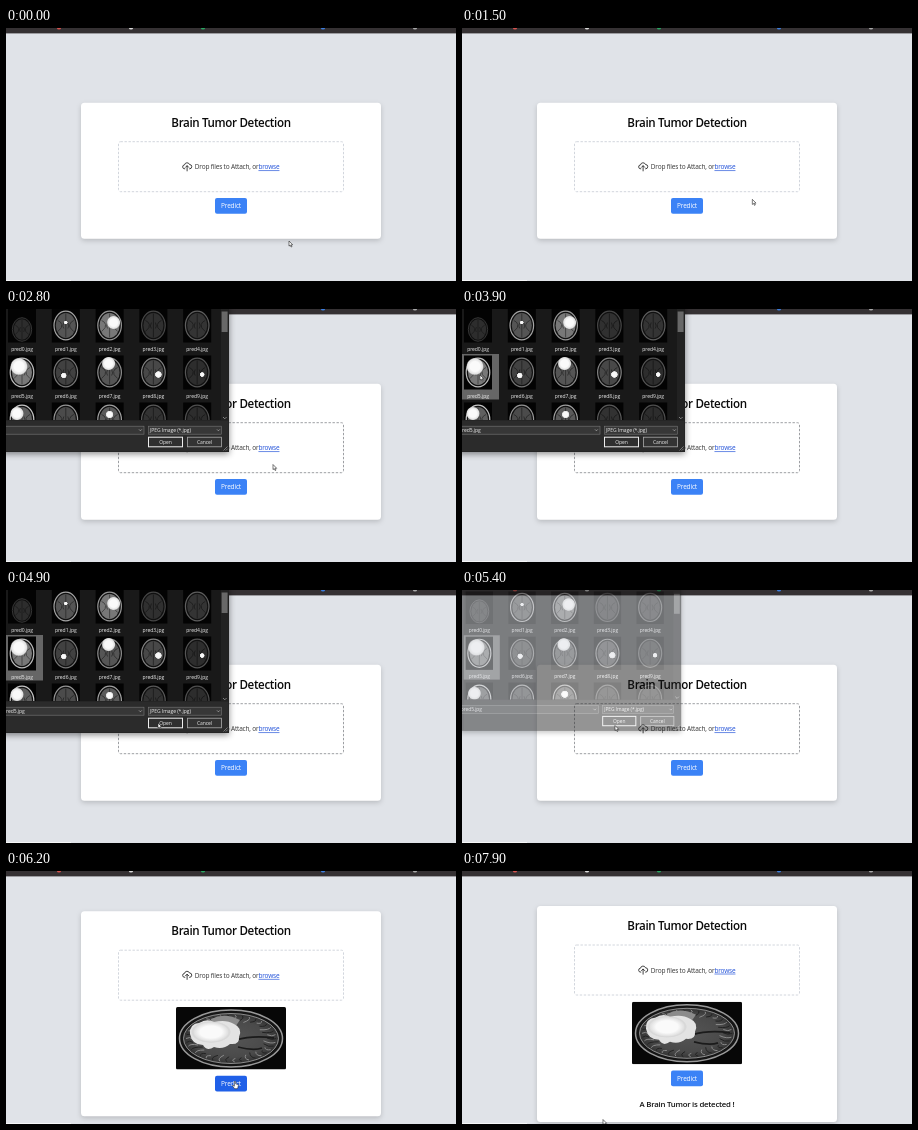
Write an HTML page that moves like this. It is 450 by 253 pixels and loops after 8 s.

```html
<!DOCTYPE html>
<html lang="en">
<head>
<meta charset="utf-8">
<title>Brain Tumor Detection</title>
<style>
  html, body { margin: 0; width: 100%; height: 100%; overflow: hidden; background: #e0e3e8; }
  svg { display: block; width: 100vw; height: 100vh; }
  text { font-family: "Open Sans", "Noto Sans", sans-serif; }
  .title { font-size: 11.6px; font-weight: 600; letter-spacing: -.35px; text-anchor: middle; fill: #0a0a0a; }
  .body { font-size: 6.5px; letter-spacing: -.18px; fill: #333; }
  .link { fill: #1d4ed8; text-decoration: underline; }
  .result { font-size: 7.8px; font-weight: 600; letter-spacing: -.23px; text-anchor: middle; fill: #111; }
  .small { font-size: 5px; letter-spacing: -.05px; fill: #eee; }
  .mid { text-anchor: middle; }
  .card { filter: drop-shadow(0 2px 2.5px rgba(0, 0, 0, .17)); }
</style>
</head>
<body>
<svg viewBox="0 0 450 253">
  <defs>
    <clipPath id="pane"><rect x="0" y="0" width="215" height="111"/></clipPath>
    <clipPath id="photoClip"><rect width="110" height="62.5" rx="1.5"/></clipPath>
    <radialGradient id="lesion">
      <stop offset=".55" stop-color="#fafafa"/><stop offset=".85" stop-color="#e0e0e0"/>
      <stop offset="1" stop-color="#bbb" stop-opacity="0"/>
    </radialGradient>
    <radialGradient id="tissue">
      <stop offset="0" stop-color="#555"/><stop offset=".75" stop-color="#4a4a4a"/><stop offset="1" stop-color="#333"/>
    </radialGradient>
    <pattern id="hatch" width="3" height="3" patternUnits="userSpaceOnUse">
      <rect width="1.4" height="1.4" fill="#999" opacity=".3"/>
    </pattern>
  </defs>

  <rect width="450" height="253" fill="#e0e3e8"/>
  <rect y="252" width="65" height="1" fill="#f6f7f8"/>
  <rect width="450" height="5.4" fill="#353133"/>
  <g id="tabs"></g>

  <g id="card">
    <rect id="panel" class="card" x="75" width="300" height="136" rx="3.5" fill="#fff"/>
    <text class="title" x="225" y="24.3">Brain Tumor Detection</text>
    <rect id="zone" x="112.5" y="39" width="225" height="50" rx="2" fill="none" stroke-width=".9" stroke-dasharray="2.4 1.6"/>
    <g fill="none" stroke="#222" stroke-width=".85" stroke-linecap="round" stroke-linejoin="round">
      <path d="M178.8 66.2a2 2 0 0 1-.3-4a2.6 2.6 0 0 1 5-.4a2.2 2.2 0 0 1 .1 4.4"/>
      <path d="M181.1 68.2v-5M179.5 64.6l1.6-1.6l1.6 1.6"/>
    </g>
    <text class="body" x="188.8" y="66.7">Drop files to Attach, or<tspan class="link">browse</tspan></text>
    <g id="photo" transform="translate(170 95.8)" clip-path="url(#photoClip)">
      <rect width="110" height="62.5" fill="#070707"/>
      <ellipse cx="55" cy="31.5" rx="51.5" ry="28.5" fill="#151515" stroke="#999" stroke-width="1.5"/>
      <ellipse cx="55" cy="31.5" rx="47.5" ry="25" fill="url(#tissue)" stroke="#bbb" stroke-width=".7"/>
      <g id="folds" fill="none" stroke-width="1"></g>
      <path d="M35 12q14-7 29 1l-5 7H36z" fill="#8b8b8b"/>
      <path d="M60 33q17-5 38-2M62 40q16 4 24 1" fill="none" stroke="#1b1b1b" stroke-width="1.8"/>
      <path d="M14 27q-1-10 9-11q8-5 15-1q12-3 20 2q9 4 5 13q1 8-9 7q-7 6-16 3q-7 5-11-2q-11 0-13-11z" fill="#e3e3e3"/>
      <ellipse cx="35" cy="25" rx="20" ry="11" fill="url(#lesion)"/>
    </g>
    <g id="button">
      <rect id="buttonFace" x="209" width="32" height="15.8" rx="2"/>
      <text class="body mid" x="225" y="10.3" style="fill:#fff">Predict</text>
    </g>
    <text id="result" class="result" x="225" y="201.2">A Brain Tumor is detected !</text>
  </g>

  <g id="ghost">
    <rect width="222" height="111" fill="#e6e6e4" opacity=".72"/>
    <rect x="215" width="7" height="111" fill="#b5b5b5" opacity=".75"/>
    <rect x="215.5" y="2" width="6" height="20" fill="#999" opacity=".5"/>
    <rect y="111" width="222" height="31.5" fill="#c8c8c8" opacity=".75"/>
    <rect y="111" width="222" height="5" fill="#bbb" opacity=".4"/>
    <rect y="126" width="142" height="15" fill="url(#hatch)"/>
    <path d="M0 117h138v8.5H0zM142 117h73v8.5h-73zM142 128h35v10h-35zM181 128h35v10h-35z" fill="#fff" opacity=".93"/>
    <text class="body" x="187" y="144" id="ghostText"></text>
  </g>

  <g id="dialog">
    <rect x="-5" y="-5" width="228" height="148" fill="#202020" style="filter:drop-shadow(0 2px 3px rgba(0,0,0,.45))"/>
    <rect width="215" height="111" fill="#191919"/>
    <rect id="selection" y="45" width="37" height="45.5" fill="#666"/>
    <g id="files" clip-path="url(#pane)"></g>
    <rect x="215" width="7" height="111" fill="#222"/>
    <rect x="215.6" y="2.5" width="6" height="20.5" fill="#686868"/>
    <path d="M217 108l1.8 1.8l1.8-1.8" fill="none" stroke="#aaa" stroke-width=".7"/>
    <rect y="111.5" width="222.5" height="31" fill="#2b2b2b"/>
    <g fill="#373737" stroke="#777" stroke-width=".6">
      <rect x="-4" y="117.2" width="142" height="8"/>
      <rect x="142.3" y="117.2" width="73" height="8"/>
    </g>
    <path d="M133 120.4l1.4 1.4l1.4-1.4M211 120.4l1.4 1.4l1.4-1.4" fill="none" stroke="#ccc" stroke-width=".6"/>
    <text id="fileName" class="small" x="-3" y="123">pred5.jpg</text>
    <text class="small" x="144" y="123">JPEG Image (*.jpg)</text>
    <rect x="142.5" y="128.2" width="34" height="9.6" fill="#2f2f2f" stroke="#eee" stroke-width="1"/>
    <rect x="181.5" y="128.2" width="34" height="9.6" fill="#333" stroke="#aaa" stroke-width=".8"/>
    <text class="small mid" x="159.5" y="134.8">Open</text>
    <text class="small mid" x="198.5" y="134.8">Cancel</text>
    <path d="M217.5 141.5l4-4M219.8 141.5l1.8-1.8" stroke="#999" stroke-width=".7"/>
  </g>

  <g id="cursor" stroke-linejoin="round" fill="#fff" stroke="#222" stroke-width=".6">
    <path id="arrow" d="M0 0v5.1l1.2-1l.9 1.9l.9-.4l-.9-1.8h1.6z"/>
    <path id="hand" d="M-.7 .6q.7-1 1.4 0v2.3l2.2.5q.6.2.5 1l-.5 2.1l-.5 1.2h-2.8l-2.2-2.9q.2-.9 1.1-.3l.8.7z"/>
  </g>
</svg>

<script>
const LOOP = 8000, STEP = 100;
const $ = id => document.getElementById(id);

function add(parent, tag, attrs, content) {
  const el = document.createElementNS("http://www.w3.org/2000/svg", tag);
  for (const key in attrs) el.setAttribute(key, attrs[key]);
  if (content) el.textContent = content;
  parent.appendChild(el);
  return el;
}

const show = (id, on) => $(id).setAttribute("visibility", on ? "visible" : "hidden");
const grey = v => `rgb(${v},${v},${v})`;

// Tab icons peeking in at the top edge
[[53, "#d9534f"], [125, "#ddd"], [197, "#28a862"], [317, "#3d7fe0"], [409, "#aaa"]]
  .forEach(([cx, fill]) => add($("tabs"), "circle", { cx, cy: -.6, r: 2.2, fill }));

// Scan thumbnails: skull grey, tissue grey, spot x, spot y, spot radius
const scans = [
  [55, 45, 0, 0, 0], [165, 85, 0, -3, 2], [150, 120, 4, -3, 7], [70, 48, 0, 0, 0], [95, 52, 0, 2, 0],
  [190, 120, -3, -6, 9], [120, 65, -2, 3, 3], [140, 85, -1, -9, 7], [130, 72, 5, 2, 3.6], [85, 45, 5, 2, 2.6],
  [200, 95, -5, -6, 7], [150, 75, 0, 0, 0], [160, 90, 0, -5, 4], [90, 50, 0, 0, 0], [80, 45, 0, 0, 0]
];
scans.forEach(([skull, tissue, dx, dy, r], i) => {
  const x = 16 + (i % 5) * 43.8, y = 16.5 + Math.floor(i / 5) * 47;
  const cell = add($("files"), "g", { transform: `translate(${x} ${y})` });
  const size = i ? 1 : .82;
  add(cell, "rect", { x: -14, y: -17, width: 28, height: 34, fill: "#030303" });
  const head = add(cell, "g", { transform: `translate(0 ${i ? 0 : 4}) scale(${size})` });
  add(head, "ellipse", { rx: 11.8, ry: 14.4, fill: "#111", stroke: grey(skull), "stroke-width": 1.2 });
  add(head, "ellipse", { rx: 10, ry: 12.5, fill: grey(tissue) });
  add(head, "path", {
    d: "M0-12V12M-8-5q3 1 4 4t-4 7M8-5q-3 1-4 4t4 7M-2-3q-2 4 0 6M2-3q2 4 0 6",
    fill: "none", stroke: grey(tissue * .55), "stroke-width": .9
  });
  if (r) add(head, "circle", { cx: dx, cy: dy, r: r, fill: "url(#lesion)" });
  add(cell, "text", { class: "small mid", y: 25.3 }, `pred${i}.jpg`);
});

// Cortex folds radiating around the scan's edge
for (let i = 0; i < 38; i++) {
  const a = i / 38 * Math.PI * 2, inner = .78 + .07 * Math.sin(i * 5);
  const at = (k, turn) => `${55 + 46 * k * Math.cos(a + turn)} ${31.5 + 24 * k * Math.sin(a + turn)}`;
  add($("folds"), "path", {
    d: `M${at(.98, 0)}Q${at(.9, .1)} ${at(inner, -.03)}`,
    stroke: i % 2 ? "#8a8a8a" : "#222"
  });
}

const path = [
  [0, 283, 213], [700, 283, 213], [900, 296, 212], [1100, 312, 198], [1300, 303, 180], [1600, 284, 167],
  [1700, 274, 154], [1900, 265, 139], [2100, 265, 140], [2400, 267, 155.5], [2900, 267, 155.5],
  [3100, 232, 142], [3400, 110, 90], [3700, 20, 66], [4000, 17, 66], [4200, 42, 82], [4500, 128, 124],
  [4700, 152, 133], [5200, 152, 133], [5400, 153, 135.5], [5600, 153, 135.5], [5800, 172, 158],
  [6000, 215, 202], [6200, 229, 210], [7300, 229, 210], [7400, 230, 212], [7500, 230, 212],
  [7600, 220, 219], [7900, 141, 248.5], [8000, 141, 248.5]
];

function pointer(t) {
  const n = path.findIndex(p => p[0] > t);
  const [t0, x0, y0] = path[n - 1], [t1, x1, y1] = path[n];
  const k = (t - t0) / (t1 - t0);
  return [x0 + (x1 - x0) * k, y0 + (y1 - y0) * k];
}

// time, opacity, scale
const fades = [
  [0, 0, 1], [2700, .85, .985], [2800, 1, 1], [5300, .9, .99], [5400, .5, .975], [5500, .1, .955], [5600, 0, 1]
];
// time, card top, card height
const layouts = [[0, 75, 136], [5600, 40.5, 205], [6800, 35.3, 216]];
const latest = (table, t) => table.filter(row => row[0] <= t).pop();
const zoom = s => `translate(70 55) scale(${s}) translate(-70 -55)`;
const within = (t, from, to) => t >= from && t < to;

function draw(t) {
  const [, top, height] = latest(layouts, t);
  const loaded = t >= 5600, hover = within(t, 6000, 7600);
  $("card").setAttribute("transform", `translate(0 ${top - .3})`);
  $("panel").setAttribute("height", height);
  $("button").setAttribute("transform", `translate(0 ${loaded ? 164.5 : 95.3})`);
  $("buttonFace").setAttribute("fill", hover ? "#2060e8" : "#3b82f6");
  $("zone").setAttribute("stroke", within(t, 1700, 5600) ? "#929599" : "#cdd2da");
  show("photo", loaded);
  show("result", t >= 6800);

  const [, opacity, scale] = latest(fades, t);
  show("ghost", within(t, 2600, 2700));
  $("ghost").setAttribute("transform", zoom(.955));
  $("dialog").setAttribute("opacity", opacity);
  $("dialog").setAttribute("transform", zoom(scale));
  $("selection").setAttribute("opacity", t >= 3900 ? 1 : within(t, 3600, 3900) ? .5 : 0);
  $("fileName").setAttribute("opacity", t >= 3900 ? 1 : 0);

  const [x, y] = pointer(t);
  const pointing = hover || within(t, 1900, 2200);
  $("cursor").setAttribute("transform", `translate(${x} ${y})`);
  show("arrow", !pointing);
  show("hand", pointing);
}

const start = performance.now();
function tick() {
  const t = (performance.now() - start) % LOOP;
  draw(Math.floor(t / STEP) * STEP);
  requestAnimationFrame(tick);
}
tick();
</script>
</body>
</html>
```
